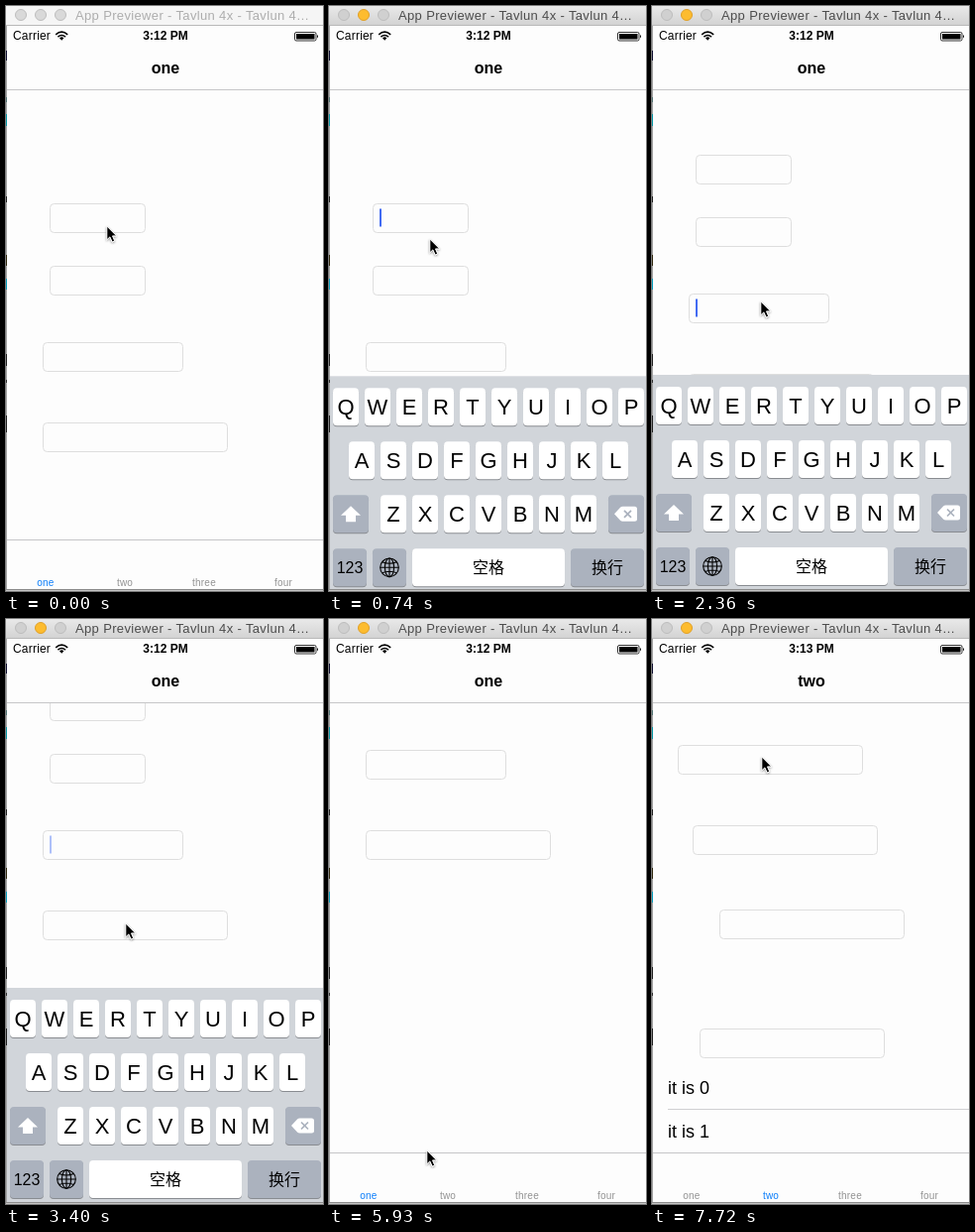
Write an HTML page that moves like this. It is 320 by 590 pixels and loops after 8 s.

```html
<!DOCTYPE html>
<html lang="en">
<head>
<meta charset="utf-8">
<style>
html, body { margin: 0; width: 100%; height: 100%; overflow: hidden; background: #fdfdfd; }
svg { display: block; width: 320px; height: 590px; font-family: "Liberation Sans", Arial, sans-serif; }
.mid { text-anchor: middle; }
.field { fill: #fdfdfd; stroke: #dedede; }
.line { fill: #c6c6c8; }
.tab { font-size: 10px; letter-spacing: .2px; text-anchor: middle; }
.key { font-size: 22px; text-anchor: middle; }
.cjk { font: 16px "Noto Sans CJK SC", "Noto Sans CJK", sans-serif; text-anchor: middle; }
</style>
</head>
<body>
<svg viewBox="0 0 320 590">
  <defs>
    <linearGradient id="active" x2="0" y2="1"><stop stop-color="#e9e9e9"/><stop offset="1" stop-color="#d2d2d2"/></linearGradient>
    <filter id="shadow" x="-50%" y="-50%" width="200%" height="200%"><feDropShadow dx="0" dy="1" stdDeviation=".9" flood-opacity=".4"/></filter>
  </defs>
  <rect width="320" height="590" fill="#fdfdfd"/>

  <g id="pageOne"><g id="scroll"></g></g>
  <g id="pageTwo">
    <g id="rows"></g>
    <g font-size="18"><text x="16" y="479">it is 0</text><text x="16" y="523">it is 1</text></g>
    <rect class="line" x="16" y="494" width="304" height="1" opacity=".8"/>
  </g>

  <rect y="20" width="320" height="64" fill="#fdfdfd"/>
  <rect class="line" y="84" width="320" height="1"/>
  <text x="7" y="34" font-size="12" letter-spacing=".2">Carrier</text>
  <g fill="none" stroke="#000" stroke-width="1.6">
    <path d="M50.2 28.8Q56.2 23.6 62.2 28.8M52.4 31.2Q56.2 27.8 60 31.2"/>
    <path d="M54 32.2Q56.2 30.5 58.4 32.2L56.2 34.7Z" fill="#000" stroke="none"/>
  </g>
  <text id="clock" class="mid" x="161" y="34" font-size="12" font-weight="bold"></text>
  <rect x="291.5" y="26.5" width="21.5" height="8.5" rx="1.5" fill="none" stroke="#000" stroke-width=".8"/>
  <path d="M293 28h18.500v5.500H293zM314 29q2 1.700 0 3.500z"/>
  <text id="title" class="mid" x="161" y="68" font-size="16" font-weight="bold"></text>

  <rect y="538" width="320" height="52" fill="#fdfdfd"/>
  <rect class="line" y="538" width="320" height="1"/>
  <g id="tabs"></g>

  <g id="keyboard">
    <rect y="372" width="320" height="220" fill="#d1d5da"/>
    <g id="keys"></g>
    <path d="M22 503l10 9.500h-5v6.500h-10v-6.500h-5z" fill="#fff"/>
    <path d="M288 511l6-6.500q1-1 2.500-1h12q2.500 0 2.500 2.500v10q0 2.500-2.500 2.500h-12q-1.500 0-2.500-1z" fill="#fff"/>
    <path d="M298 507.500l7 7m0-7l-7 7" stroke="#abb2be" stroke-width="1.700"/>
    <g fill="none" stroke="#000" stroke-width="1.100">
      <circle cx="61" cy="565" r="9.300"/><ellipse cx="61" cy="565" rx="4.600" ry="9.300"/>
      <path d="M51.700 565h18.600M61 555.700v18.600M53.700 559.500q7.300 3 14.600 0M53.700 570.500q7.300-3 14.600 0"/>
    </g>
  </g>

  <rect id="bar" width="320" height="20"/>
  <rect y="19" width="320" height="1" fill="#b9b9b9"/>
  <g id="lights"></g>
  <text id="caption" x="70" y="14" font-size="13" letter-spacing=".35">App Previewer - Tavlun 4x - Tavlun 4…</text>
  <rect y="20" width="1" height="570" fill="#a5a5a5"/>
  <g id="edge"></g>
  <rect y="588" width="320" height="1" fill="#8c8c8c"/>
  <rect y="589" width="320" height="1" fill="#c4c4c4"/>

  <path id="cursor" d="M.8 1V14.800L3.900 11.900L6.200 17L8.700 15.900L6.500 10.900H10.700Z" stroke="#fff" stroke-width="1" filter="url(#shadow)"/>
</svg>
<script>
const LOOP = 8000;
const $ = id => document.getElementById(id);
const show = (el, on) => el.setAttribute('visibility', on ? 'visible' : 'hidden');
const fill = (el, color) => el.setAttribute('fill', color);
const put = (id, list) => { $(id).innerHTML = list.join(''); };
const clamp = v => Math.min(1, Math.max(0, v));
const smooth = p => p * p * (3 - 2 * p);

const fields = [[44, 199, 97], [44, 262, 97], [37, 339, 142], [37, 420, 187]];
const lower = [[26, 127, 187], [41, 208, 187], [68, 293, 187], [48, 413, 187]];
const box = ([x, y, w]) =>
  `<rect class="field" x="${x + .5}" y="${y + .5}" width="${w - 1}" height="29" rx="4"/>`;
put('scroll', [...fields.map(box), '<rect id="caret" width="2" height="18" fill="#426bf2"/>']);
put('rows', lower.map(box));

const names = ['one', 'two', 'three', 'four'];
put('tabs', names.map((n, i) => `<text class="tab" x="${40 + 80 * i}" y="585">${n}</text>`));
put('lights', [15, 35, 55].map(x => `<circle cx="${x}" cy="9" r="5.500"/>`));
put('edge', [[45, 10, '#113'], [92, 5, '#577'], [109, 12, '#089aa8'], [192, 6, '#222'], [251, 11, '#332b10'],
  [275, 11, '#08a0c0'], [351, 12, '#222'], [377, 3, '#333'], [413, 17, '#222']]
  .map(([y, h, c]) => `<rect y="${y}" width="1" height="${h}" fill="${c}"/>`));

function key(x, y, w, label, cls = 'key', color = '#fff', size = '') {
  const rect = (dy, c) => `<rect x="${x}" y="${y + dy}" width="${w}" height="38" rx="4" fill="${c}"/>`;
  const drop = cls === 'key' ? 27 : 25;
  return rect(1, '#898c91') + rect(0, color) +
    `<text class="${cls}" x="${x + w / 2}" y="${y + drop}" ${size}>${label}</text>`;
}
const letters = (text, x, y) => [...text].map((c, i) => key(x + 32 * i, y, 26, c));
const dark = '#abb2be';
put('keys', [
  ...letters('QWERTYUIOP', 4, 384), ...letters('ASDFGHJKL', 20, 438), ...letters('ZXCVBNM', 52, 492),
  key(4, 492, 36, '', 'key', dark), key(282, 492, 36, '', 'key', dark),
  key(4, 546, 34, '123', 'mid', dark, 'font-size="16"'), key(44, 546, 34, '', 'key', dark),
  key(84, 546, 154, '空格', 'cjk'), key(244, 546, 74, '换行', 'cjk', dark)
]);

// [time, x, y] of the pointer
const path = [[0, 101, 221], [450, 101, 221], [740, 101, 234], [1180, 104, 268], [1650, 104, 268],
  [2240, 109, 297], [2850, 109, 297], [3350, 120, 306], [3500, 120, 306], [3990, 239, 283],
  [4480, 239, 283], [5180, 199, 420], [5500, 199, 420], [5920, 98, 535], [6100, 98, 535],
  [6380, 111, 562], [6570, 111, 562], [6970, 109, 405], [7130, 109, 405], [7700, 110, 138]];

function pointer(t) {
  const i = path.findIndex(p => p[0] > t);
  if (i < 0) return path.at(-1).slice(1);
  const [a, b] = [path[i - 1], path[i]];
  const p = smooth((t - a[0]) / (b[0] - a[0]));
  return [a[1] + (b[1] - a[1]) * p, a[2] + (b[2] - a[2]) * p];
}

// [time, focused field]
const focus = [[0, -1], [150, 0], [1250, 1], [2300, 2], [3480, 3], [4140, -1]];
const scrolls = [[1250, 49], [2360, 77], [3490, 81]];
const offset = t => scrolls.reduce((sum, [at, by]) => sum + by * smooth(clamp((t - at) / 290)), 0);

// critically damped spring, 0 to 1
function spring(ms) {
  const x = Math.max(0, ms) * .0122;
  return 1 - (1 + x) * Math.exp(-x);
}

function blink(age) {
  const p = age % 1200;
  return p < 700 ? 1 : p < 850 ? (850 - p) / 150 : p < 1030 ? 0 : (p - 1030) / 170;
}

function draw(t) {
  const page = t < 6670 ? 0 : 1, on = t >= 150;
  fill($('bar'), on ? 'url(#active)' : '#f5f5f5');
  fill($('caption'), on ? '#4c4c4c' : '#adadad');
  [...$('lights').children].forEach((c, i) => {
    const lit = on && i === 1;
    fill(c, lit ? '#fdbc2f' : on ? '#d0d0d0' : '#d9d9d9');
    c.setAttribute('stroke', lit ? '#e0a028' : '#bdbdbd');
  });
  show($('pageOne'), !page);
  show($('pageTwo'), page);
  $('title').textContent = names[page];
  $('clock').textContent = t < 7400 ? '3:12 PM' : '3:13 PM';
  [...$('tabs').children].forEach((el, i) => fill(el, i === page ? '#0a7dfa' : '#929292'));

  $('scroll').setAttribute('transform', `translate(0 ${-offset(t)})`);
  const [since, index] = focus.findLast(f => f[0] <= t);
  const caret = $('caret'), [x, y] = fields[Math.max(0, index)];
  caret.setAttribute('x', x + 7);
  caret.setAttribute('y', y + 5.5);
  caret.setAttribute('opacity', index < 0 ? 0 : blink(t - since));

  const down = 218 * (1 - spring(t - 150) + spring(t - 4175));
  $('keyboard').setAttribute('transform', `translate(0 ${down})`);
  $('cursor').setAttribute('transform', `translate(${pointer(t)})`);
}

function tick() {
  draw(performance.now() % LOOP);
  requestAnimationFrame(tick);
}
tick();
</script>
</body>
</html>
```
